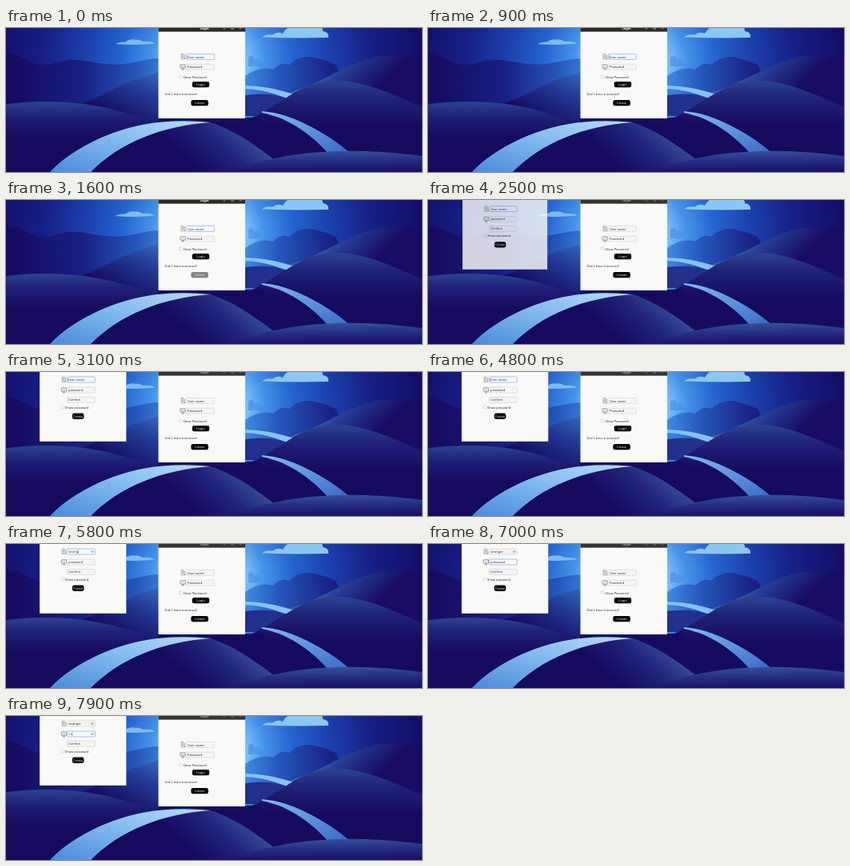
An HTML page for the animation above (8 s loop, 520x180 px).

```html
<!DOCTYPE html>
<html lang="en">
<head>
<meta charset="utf-8">
<title>Sign up form</title>
<style>
html, body { margin: 0; width: 100%; height: 100%; overflow: hidden; background: #160a5e; }
svg { display: block; width: 520px; height: 180px; }
text { font: 4px "Noto Sans", "Open Sans", sans-serif; fill: #333; }
.btn text { font-weight: 500; fill: #eee; text-anchor: middle; }
.field rect { fill: #f5f5f5; stroke: #cfcfcf; stroke-width: .6; }
.field.focus rect { fill: #f8fafd; stroke: #86abe2; stroke-width: .7; }
.caret { stroke: #333; stroke-width: .45; }
</style>
</head>
<body>
<svg viewBox="0 0 520 180">
  <defs>
    <radialGradient id="sky" gradientUnits="userSpaceOnUse" cx="252" cy="46" r="270">
      <stop offset="0" stop-color="#a4dcfc"/>
      <stop offset=".18" stop-color="#7cc0f7"/>
      <stop offset=".26" stop-color="#4794ea"/>
      <stop offset=".4" stop-color="#2463ce"/>
      <stop offset=".56" stop-color="#1c41ad"/>
      <stop offset=".76" stop-color="#161f86"/>
      <stop offset="1" stop-color="#150c65"/>
    </radialGradient>
    <radialGradient id="far" gradientUnits="userSpaceOnUse" cx="252" cy="66" r="240">
      <stop offset=".2" stop-color="#3f8ae2"/>
      <stop offset=".38" stop-color="#2455b8"/>
      <stop offset=".65" stop-color="#191f83"/>
      <stop offset="1" stop-color="#160b60"/>
    </radialGradient>
    <linearGradient id="leftSlope" gradientUnits="userSpaceOnUse" x1="184" y1="54" x2="150" y2="120">
      <stop offset="0" stop-color="#3464b8"/><stop offset=".4" stop-color="#223994"/><stop offset="1" stop-color="#160a5e"/>
    </linearGradient>
    <linearGradient id="rightSlope" gradientUnits="userSpaceOnUse" x1="395" y1="48" x2="440" y2="96">
      <stop offset="0" stop-color="#3a64b4"/><stop offset=".4" stop-color="#25378f"/><stop offset="1" stop-color="#170c61"/>
    </linearGradient>
    <linearGradient id="mid" x2="0" y2="1">
      <stop offset="0" stop-color="#2c438f"/><stop offset=".2" stop-color="#1f2178"/><stop offset=".5" stop-color="#160a5e"/>
    </linearGradient>
    <linearGradient id="ridge" gradientUnits="userSpaceOnUse" x1="312" y1="140" x2="262" y2="196">
      <stop offset="0" stop-color="#354d96"/><stop offset=".45" stop-color="#20227a"/><stop offset="1" stop-color="#160a5e"/>
    </linearGradient>
    <linearGradient id="near" x2=".1" y2="1">
      <stop offset="0" stop-color="#37549c"/><stop offset=".5" stop-color="#252f85"/><stop offset="1" stop-color="#191269"/>
    </linearGradient>
    <linearGradient id="road" x1="0" y1="1" x2="1" y2="0">
      <stop offset="0" stop-color="#4a8ada"/><stop offset=".5" stop-color="#7fb8ee"/><stop offset="1" stop-color="#b9dcf8"/>
    </linearGradient>
    <linearGradient id="lane" x2="1" y2="1">
      <stop offset="0" stop-color="#82bcf2"/><stop offset="1" stop-color="#3769c4"/>
    </linearGradient>

    <g id="userIcon" fill="none" stroke="#777" stroke-width=".5">
      <path d="M1 .6H4.2L5.6 2V7H1Z" fill="#eee"/>
      <circle cx="3.2" cy="3" r=".9"/>
      <path d="M1.8 5.6Q3.2 3.6 4.7 5.6M5.4 5.4L6.4 6.8"/>
    </g>
    <g id="keyIcon" fill="#eef1f4" stroke="#666" stroke-width=".6">
      <rect x=".5" y=".7" width="6.2" height="4.5" rx=".4"/>
      <path d="M3.6 5.2V6.8M1.8 6.9H5.4"/>
      <path d="M2.3 3H5" stroke="#999"/>
    </g>
    <g id="eye" fill="none" stroke="#888" stroke-width=".45">
      <path d="M0 1.5Q2 -.7 4 1.5Q2 3.7 0 1.5Z"/>
      <circle cx="2" cy="1.5" r=".6"/>
    </g>
    <rect id="box" width="3.4" height="3.4" rx=".5" fill="#fff" stroke="#bbb" stroke-width=".5"/>
  </defs>

  <rect width="520" height="180" fill="url(#sky)"/>
  <path d="M137 20Q141 17 149 17.5Q154 13 162 14.5Q168 14 171 17Q181 16 187 19.5Q162 22 137 20Z" fill="#7fb9ee"/>
  <path d="M320 11.5Q325 7 333 8.5Q339 4 346 7Q350 -2 362 -3H390Q397 0 396 4Q404 5 403 12Q362 13 320 11.5Z" fill="#8cc6f2"/>

  <path d="M0 32C20 33 30 46 46 46S72 37 92 40S128 47 146 45S176 38 194 38V130H0Z" fill="url(#far)"/>
  <path d="M299 60Q318 47 334 52Q344 41 354 46Q364 35 380 36Q394 38 412 46L440 100H299Z" fill="url(#far)"/>
  <path d="M303 48V37Q308 32 311 40Q318 35 321 48Z" fill="#4a92e4" opacity=".7"/>
  <path d="M340 84C392 75 432 36 476 35Q500 34 520 38V130H340Z" fill="url(#rightSlope)"/>
  <path d="M299 72C325 73 345 77 368 86L352 89C336 81 318 77 299 76Z" fill="#86c2f5"/>
  <path d="M299 84Q330 80 352 88L330 110H299Z" fill="#20308c"/>
  <path d="M285 120C332 109 361 68 406 66C446 64 488 85 520 99V180H285Z" fill="url(#mid)"/>

  <path d="M60 104C118 94 146 62 196 55V150H60Z" fill="url(#leftSlope)"/>
  <path d="M0 95C50 89 96 92 134 102Q166 111 196 119V180H0Z" fill="url(#mid)"/>

  <path d="M190 112H320L355 180H190Z" fill="#160a5e"/>
  <path d="M105 180C142 143 196 122 256 118C300 133 326 160 358 180Z" fill="url(#ridge)"/>
  <path d="M55 180C84 149 140 122 195 117.5Q225 115 256 118C196 122 142 143 106 180Z" fill="url(#road)"/>
  <path d="M320 104C355 106 400 130 431 157H403C385 137 357 113 320 106Z" fill="url(#lane)"/>
  <path d="M280 180C340 154 425 147 520 160V180Z" fill="url(#near)"/>

  <g id="login">
    <rect x="190.5" y="-8" width="108.5" height="121" fill="#f9f9f8"/>
    <rect id="bar" x="190.5" y="-8" width="108.5" height="12.6" fill="#2b2929"/>
    <g id="barText">
      <text x="248" y="1.5" text-anchor="middle" style="font-weight:700;fill:#fff">Login</text>
      <path d="M271.5 1H274.5M281.8 -1V1.2H284.6V-1M291.8 1.4L294.4 -1.2M291.8 -1.2L294.4 1.4" fill="none" stroke="#ddd" stroke-width=".6"/>
    </g>
    <use href="#userIcon" x="218" y="32"/>
    <use href="#keyIcon" x="217.5" y="45"/>
    <use href="#box" x="216.5" y="59.3"/>
    <text x="221.5" y="62.6">Show Password</text>
    <text x="198.5" y="84.4">Don't have a account!</text>
  </g>

  <g id="signup">
    <rect x="42" y="-20" width="108.3" height="106.8" fill="#f9f9f8"/>
    <use href="#userIcon" x="69" y="5.5"/>
    <use href="#keyIcon" x="68.8" y="19"/>
    <use href="#box" x="69.3" y="42.3"/>
    <text x="74" y="45.6">Show password</text>
  </g>
</svg>
<script>
const NS = 'http://www.w3.org/2000/svg';
const $ = id => document.getElementById(id);
const LOOP = 8000;
const PRESS = 1500, RELEASE = 1800, OPEN = 2350, OPEN_TIME = 280;
const NAME = 'stranger';
const NAME_START = 4850, NAME_STEP = 180;
const PASS_FOCUS = 6600, PASS_START = 7350, PASS_STEP = 220;

function add(parent, tag, attrs, text) {
  const el = document.createElementNS(NS, tag);
  for (const k in attrs) el.setAttribute(k, attrs[k]);
  if (text) el.textContent = text;
  return parent.appendChild(el);
}

function field(parent, x, y, hint) {
  const g = add(parent, 'g', { class: 'field' });
  add(g, 'rect', { x, y, width: 35, height: 7, rx: 1 });
  const label = add(g, 'text', { x: x + 1.7, y: y + 5.1 }, hint);
  const eye = add(g, 'use', { href: '#eye', x: x + 29.5, y: y + 2 });
  const caret = add(g, 'path', { class: 'caret' });
  return (value, focus, blink) => {
    g.classList.toggle('focus', focus);
    label.textContent = value || hint;
    eye.style.display = value ? '' : 'none';
    const cx = x + 1.5 + (value ? label.getComputedTextLength() + .4 : 0);
    caret.setAttribute('d', `M${cx} ${y + 1.4}v4.4`);
    caret.style.display = focus && blink ? '' : 'none';
  };
}

function button(parent, x, y, w, label) {
  const g = add(parent, 'g', { class: 'btn' });
  const face = add(g, 'rect', { x, y, width: w, height: 7.3, rx: 2.4, fill: '#050505' });
  add(g, 'text', { x: x + w / 2, y: y + 5 }, label);
  return face;
}

const login = $('login'), signup = $('signup');
const loginName = field(login, 225.3, 32.4, 'User name');
const loginPass = field(login, 225.3, 45.2, 'Password');
button(login, 232.7, 67, 21.5, 'Login');
const create = button(login, 231.3, 90, 21.6, 'Create');

const newName = field(signup, 76.3, 6, 'User name');
const newPass = field(signup, 76.3, 19, 'password');
const confirm = field(signup, 76.3, 31.3, 'Confirm');
button(signup, 82.8, 51.6, 14.6, 'Create');

const clamp = (v, hi) => Math.min(hi, Math.max(0, v));
const typed = (t, start, step, max) => clamp(Math.floor((t - start) / step) + 1, max);

function draw(t) {
  const open = t >= OPEN;
  const blink = t % 900 < 600;
  const onName = open && t < PASS_FOCUS;

  create.setAttribute('fill', t >= PRESS && t < RELEASE ? '#858585' : '#050505');
  $('bar').setAttribute('fill', open ? '#343232' : '#2b2929');
  $('barText').setAttribute('opacity', open ? .55 : 1);

  const p = clamp((t - OPEN) / OPEN_TIME, 1);
  const ease = 1 - (1 - p) ** 2;
  signup.style.display = open ? '' : 'none';
  signup.setAttribute('opacity', .8 * ease + .2);
  signup.setAttribute('transform', `translate(96 87) scale(${.9 + .1 * ease}) translate(-96 -87)`);

  loginName('', !open, blink);
  loginPass('', false, false);
  const letters = typed(t, NAME_START, NAME_STEP, NAME.length);
  newName(NAME.slice(0, letters), onName, blink || letters > 0);
  const dots = typed(t, PASS_START, PASS_STEP, 3);
  newPass('•'.repeat(dots), open && !onName, blink || dots > 0);
  confirm('', false, false);
}

function tick() {
  draw(performance.now() % LOOP);
  requestAnimationFrame(tick);
}
tick();
</script>
</body>
</html>
```
